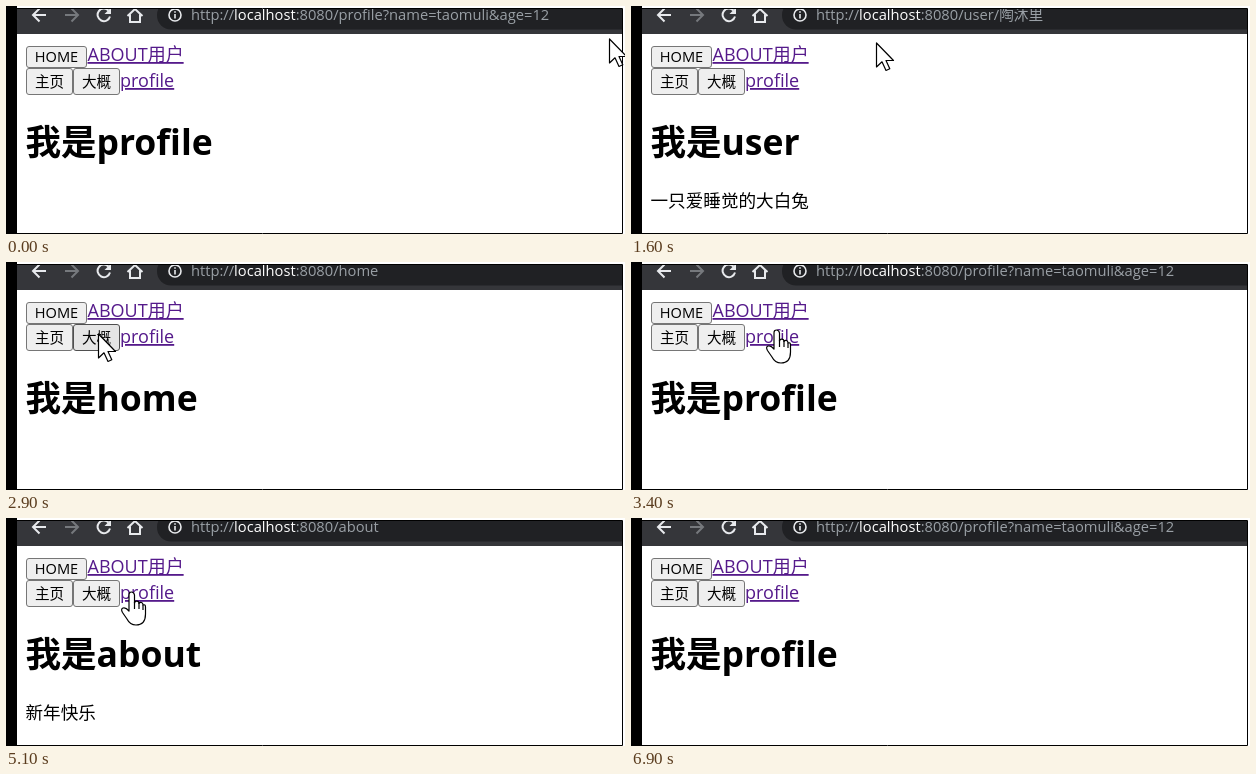
An HTML page for the animation above (7 s loop, 619x228 px).

```html
<!DOCTYPE html>
<html lang="zh">
<head>
<meta charset="utf-8">
<title>Router demo</title>
<style>
html, body { margin: 0; width: 100%; height: 100%; overflow: hidden; background: #fff; }
svg { display: block; width: 619px; height: 228px; }
text { font-family: "Open Sans", "Noto Sans CJK SC", "Noto Sans CJK", sans-serif; white-space: pre; }
.url { font-size: 14.7px; fill: #9aa0a6; }
.url .host, .picked { fill: #fff; }
.icon { fill: none; stroke: #e8eaed; stroke-width: 2; }
.dim { stroke: #76797d; }
.thin { stroke-width: 1.6; }
.btn rect { fill: #efefef; stroke: #767676; rx: 2.5px; }
.btn.hover rect { fill: #e5e5e5; stroke: #4f4f4f; }
.btn text { font-size: 14.6px; text-anchor: middle; }
.link { font-size: 18px; fill: #551a8b; text-decoration: underline; }
.title { font-size: 35.5px; font-weight: 700; }
.note { font-size: 17.6px; }
.cursor path { fill: #fff; stroke: #000; stroke-width: 1.2; stroke-linejoin: round; }
.cursor .line { fill: none; }
.cursor .beam { fill: none; stroke: #fff; stroke-width: 2; }
</style>
</head>
<body>
<svg viewBox="0 0 619 228">
  <defs>
    <clipPath id="bar"><rect x="11" y="3" width="605" height="25"/></clipPath>
    <clipPath id="pick"><rect class="pick" height="20"/></clipPath>
  </defs>
  <rect width="619" height="228" fill="#fff"/>
  <rect width="11" height="228"/>
  <path d="M0 2.5H616.5V227.5H0" fill="none" stroke="#000"/>

  <g clip-path="url(#bar)">
    <rect x="11" width="605" height="28" fill="#35363a"/>
    <rect id="pill" x="151" y="-5" width="560" height="28.5" rx="14" fill="#202124"/>
    <path class="icon" d="M40 9H27M33.5 2.5L27 9l6.5 6.5"/>
    <path class="icon dim" d="M59 9H72M65.5 2.5L72 9l-6.5 6.5"/>
    <path class="icon" d="M102.5 4.5A6.3 6.3 0 1 0 104 10.5"/>
    <path d="M105 1.5V8h-6.5z" fill="#e8eaed"/>
    <path class="icon" d="M121.5 10L129 3L136.500 10M124 8.500V16H134V8.500"/>
    <circle class="icon thin" cx="169" cy="9" r="6"/>
    <path class="icon thin" d="M169 8V12.5M169 5.2V6.8"/>
    <text class="url" id="url" x="185" y="14"></text>
    <rect class="pick" height="20" fill="#1259bd"/>
    <g clip-path="url(#pick)"><text class="url picked" id="picked" x="185" y="14"></text></g>
  </g>

  <g id="buttons"></g>
  <text class="link" x="81.5" y="55">ABOUT用户</text>
  <text class="link" x="114" y="81">profile</text>
  <text class="title" id="title" x="19.5" y="149"></text>
  <text class="note" id="note" x="19.5" y="201"></text>

  <g class="cursor" id="cursor">
    <path id="arrow" d="M.5 0V24L6 18.8L10 27.5L13.8 25.8L10 17.5H17.5Z"/>
    <g id="hand">
      <path d="M-4 18V3Q-4 0 -1.500 0T1.500 3V11Q2 9 4 9.200T6 11.500Q7 10 8.500 10.500T10 13Q12.500 12 12.500 15V22Q12.500 33 3 33Q-3 33 -6 27L-10.500 20.500Q-12.500 17 -10 16T-4 19Z"/>
      <path class="line" d="M1.500 10V17M6 11V17M10 13V18"/>
    </g>
    <path class="beam" id="beam" d="M-5 -9H-1L1 -8L3 -9H7M1 -8V10M-5 11.500H-1L1 10L3 11.500H7"/>
  </g>
</svg>
<script>
const LOOP = 7000, STEP = 100;
const REST = 100;      // pause after each stop; a click answers when it ends
const PICK_LAG = 120;  // the selection trails the pointer
const $ = id => document.getElementById(id);

const notes = { user: "一只爱睡觉的大白兔", about: "新年快乐" };
const paths = { profile: "/profile?name=taomuli&age=12", user: "/user/陶沐里" };

const stop = (at, x, y, page) => ({ at, x, y, page });
const stops = [
  stop(-REST, 603, 33, "profile"),
  stop(200, 450, 108),
  stop(1000, 139, 96),
  stop(1300, 158, 48, "user"),
  stop(2000, 315, 28),
  stop(2500, 64, 57, "home"),
  stop(2900, 92, 72, "about"),
  stop(3300, 147, 68, "profile"),
  stop(3800, 92, 72, "about"),
  stop(4300, 147, 68, "profile"),
  stop(4700, 92, 72, "about"),
  stop(5100, 127, 74, "profile")
];
const press = stop(5800, 316, 9), release = stop(6500, 540, 9);
stops.push(press, stop(6100, 438, 9), release, stop(6900, 650, 40));

const inside = (p, b) => p.x >= b.x && p.x < b.x + b.w && p.y >= b.y && p.y < b.y + b.h;
const box = (x, y, w, h) => ({ x, y, w, h });
const links = [box(82, 40, 96, 20), box(114, 63, 54, 25)];

function addButton(label, x, y, w, h) {
  const g = document.createElementNS("http://www.w3.org/2000/svg", "g");
  g.innerHTML = `<rect x="${x + .5}" y="${y + .5}" width="${w - 1}" height="${h - 1}"/>` +
    `<text x="${x + w / 2}" y="${y + h / 2 + 5.2}">${label}</text>`;
  $("buttons").append(g);
  return { g, ...box(x, y, w, h) };
}
const buttons = [
  addButton("HOME", 20, 40, 61, 22),
  addButton("主页", 20, 62, 47, 27),
  addButton("大概", 67, 62, 47, 27)
];

const easeOut = p => 1 - (1 - p) ** 2;

function pointer(t) {
  const i = stops.findIndex(s => s.at > t);
  if (i < 0) return stops.at(-1);
  const a = stops[i - 1], b = stops[i], from = a.at + REST;
  const p = easeOut(Math.max(0, (t - from) / (b.at - from)));
  return { x: a.x + (b.x - a.x) * p, y: a.y + (b.y - a.y) * p };
}

let shown;
function showPage(name) {
  if (name === shown) return;
  shown = name;
  const url = `http://<tspan class="host">localhost</tspan>:8080${paths[name] || "/" + name}`;
  $("url").innerHTML = $("picked").innerHTML = url;
  $("title").textContent = "我是" + name;
  $("note").textContent = notes[name] || "";
}

function showPick(t) {
  const focused = t >= press.at + REST && t < release.at + REST;
  const width = focused ? Math.max(0, pointer(t - PICK_LAG).x - press.x) : 0;
  for (const r of document.querySelectorAll(".pick")) {
    r.setAttribute("x", press.x);
    r.setAttribute("width", width);
  }
  $("pill").setAttribute("stroke", focused ? "#52647f" : "none");
}

function showPointer(p) {
  const overLink = links.some(b => inside(p, b));
  const kind = overLink ? "hand" : p.y < 24 && p.x > 180 ? "beam" : "arrow";
  for (const id of ["arrow", "hand", "beam"]) $(id).style.display = id === kind ? "" : "none";
  $("cursor").setAttribute("transform", `translate(${Math.round(p.x)} ${Math.round(p.y)})`);
  for (const b of buttons) b.g.setAttribute("class", inside(p, b) ? "btn hover" : "btn");
}

function draw(now) {
  const t = Math.floor(now % LOOP / STEP) * STEP;
  showPage(stops.filter(s => s.page && s.at + REST <= t).pop().page);
  showPick(t);
  showPointer(pointer(t));
}

const start = performance.now();
function tick() {
  draw(performance.now() - start);
  requestAnimationFrame(tick);
}
tick();
</script>
</body>
</html>
```
